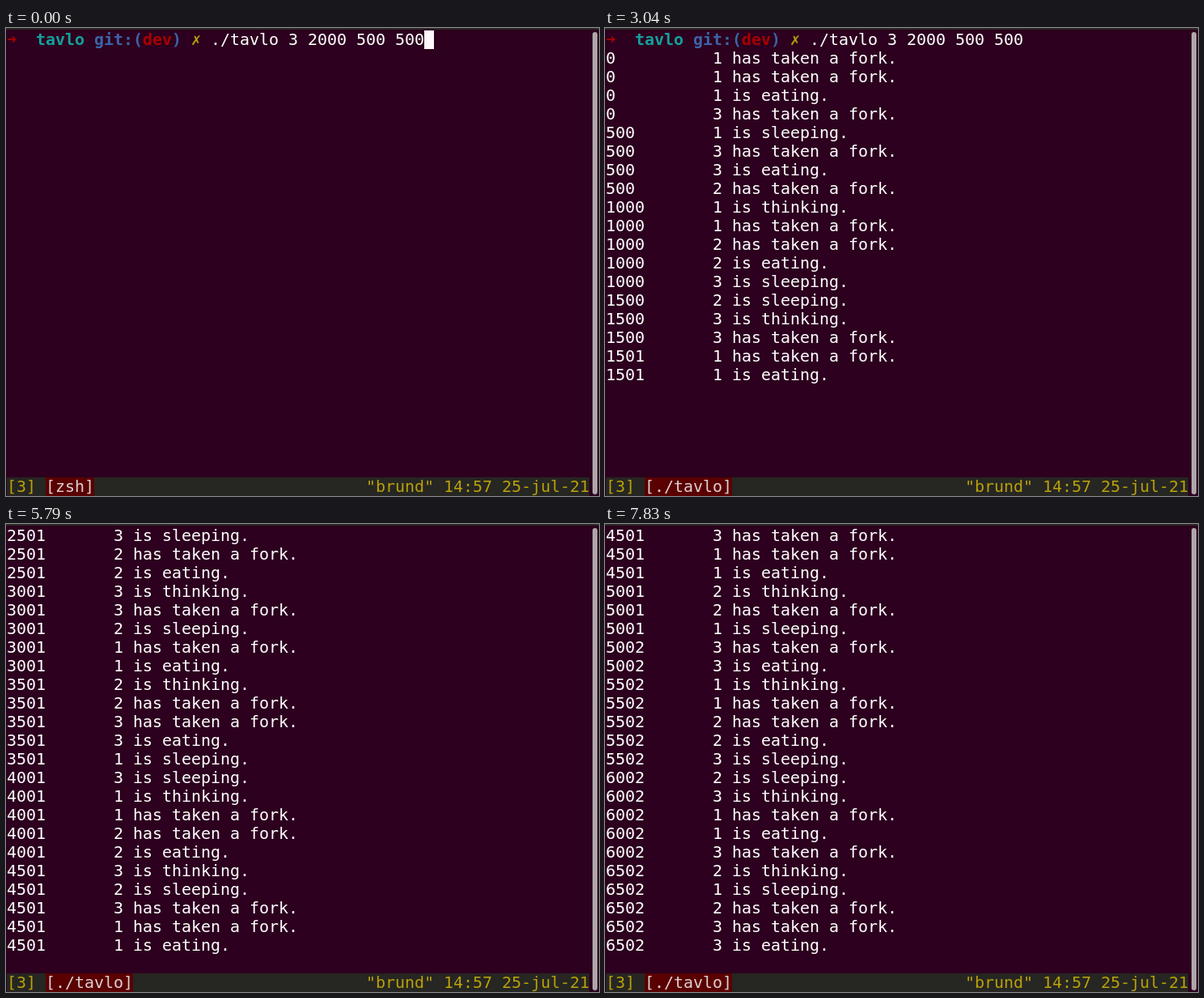
An HTML page that plays this animation: 733x578 px, repeating every 8 s.

```html
<!DOCTYPE html>
<html lang="en">
<head>
<meta charset="utf-8">
<title>Terminal</title>
<style>
  html, body { margin: 0; width: 100%; height: 100%; overflow: hidden; background: #2c001e; }
  #term {
    position: absolute; left: 0; top: 0; width: 733px; height: 578px; overflow: hidden;
    background: #2c001e; color: #fff;
    font: 20px/23px "DejaVu Sans Mono", monospace;
    font-variant-ligatures: none;
  }
  #term div { position: absolute; }
  #term .cell { height: 23px; white-space: pre; }
  #edge { left: 0; top: 0; width: 733px; height: 2px; background: #2b2926; }
  #thumb { left: 725px; top: 5px; width: 6px; height: 571px; border-radius: 3px; background: #aea6a9; }
  #bar { left: 1px; top: 555px; width: 720px; height: 23px; background: #262622; }
  #term .cursor { width: 12px; background: #fff8fd; }
  .bold { font-weight: bold; }
  .red { color: #a60000; }
  .cyan { color: #14a09c; }
  .blue { color: #3c63a6; }
  .yellow { color: #b8a00c; }
  .tab { background: #5a0000; color: #dccfd2; }
</style>
</head>
<body>
<div id="term">
  <div id="edge"></div>
  <div id="bar"></div>
  <div id="thumb"></div>
</div>
<script>
const LOOP = 8000, COLS = 12, ROW = 23, LEFT = 1, TOP = 3, ROWS = 24;
const APP = "./tavlo";
const term = document.getElementById("term");

function cell(col, row, text, cls = "", parent = term) {
  const el = document.createElement("div");
  el.className = "cell " + cls;
  el.textContent = text;
  el.style.left = LEFT + col * COLS + "px";
  el.style.top = TOP + row * ROW + "px";
  parent.append(el);
  return el;
}

// Snap the font's advance to the whole-pixel terminal grid.
const probe = cell(0, 0, "0".repeat(100));
term.style.letterSpacing = COLS - probe.getBoundingClientRect().width / 100 + "px";
probe.remove();

const prompt = document.createElement("div");
prompt.style.cssText = "left:0;top:0";
term.append(prompt);
[
  [0, "➜", "bold red"],
  [3, "tavlo", "bold cyan"],
  [9, "git:(", "bold blue"],
  [14, "dev", "bold red"],
  [17, ")", "bold blue"],
  [19, "✗", "yellow"],
  [21, APP + " 3 2000 500 500", ""]
].forEach(([col, text, cls]) => cell(col, 0, text, cls, prompt));

const rows = Array.from({ length: ROWS }, (_, i) => cell(0, i, ""));
const cursor = cell(0, 0, "", "cursor");

cell(0, ROWS, "[3]", "yellow");
const tab = cell(4, ROWS, "", "tab");
cell(37, ROWS, '"brund" 14:57 25-jul-21', "yellow");

const ACTS = { f: "has taken a fork.", e: "is eating.", s: "is sleeping.", t: "is thinking." };

// [shown at ms, printed stamp, who + action]
const log = [
  [1290, 0, "1f 1f 1e 3f"],
  [1830, 500, "1s 3f 3e 2f"],
  [2290, 1000, "1t 1f 2f 2e 3s"],
  [2790, 1500, "2s 3t 3f"],
  [2790, 1501, "1f 1e"],
  [3420, 2001, "2t 1s 2f 3f 3e"],
  [3790, 2501, "1t 1f 3s 2f 2e"],
  [4420, 3001, "3t 3f 2s 1f 1e"],
  [4790, 3501, "2t 2f 3f 3e 1s"],
  [5420, 4001, "3s 1t 1f 2f 2e"],
  [5790, 4501, "3t 2s 3f 1f 1e"],
  [6290, 5001, "2t 2f 1s"],
  [6290, 5002, "3f 3e"],
  [6920, 5502, "1t 1f 2f 2e 3s"],
  [7290, 6002, "2s 3t 1f 1e 3f"],
  [7830, 6502, "2t 1s 2f 3f 3e"]
].flatMap(([at, stamp, list]) => list.split(" ").map(([who, act]) => ({
  at, text: String(stamp).padEnd(11) + who + " " + ACTS[act]
})));

// The cursor starts lit and flips at each of these times.
const flips = [170, 750, 1830, 2460, 3040, 3790, 4250, 4880, 5460, 6040, 6670, 7290, 7830];

function setText(el, text) {
  if (el.textContent !== text) el.textContent = text;
}

function draw(t) {
  const shown = log.filter(line => line.at <= t);
  const end = shown.length + 1;
  const scroll = Math.max(0, end - ROWS + 1);
  prompt.style.visibility = scroll ? "hidden" : "visible";
  rows.forEach((el, i) => {
    const line = shown[i + scroll - 1];
    setText(el, line ? line.text : "");
  });

  const running = shown.length > 0;
  const lit = flips.filter(at => at <= t).length % 2 === 0;
  cursor.style.visibility = lit ? "visible" : "hidden";
  cursor.style.left = LEFT + (running ? 0 : 43) * COLS + "px";
  cursor.style.top = TOP + (running ? end - scroll : 0) * ROW + "px";
  setText(tab, t < 1830 ? "[zsh]" : "[" + APP + "]");
}

const start = performance.now();
function tick() {
  draw((performance.now() - start) % LOOP);
  requestAnimationFrame(tick);
}
tick();
</script>
</body>
</html>
```
